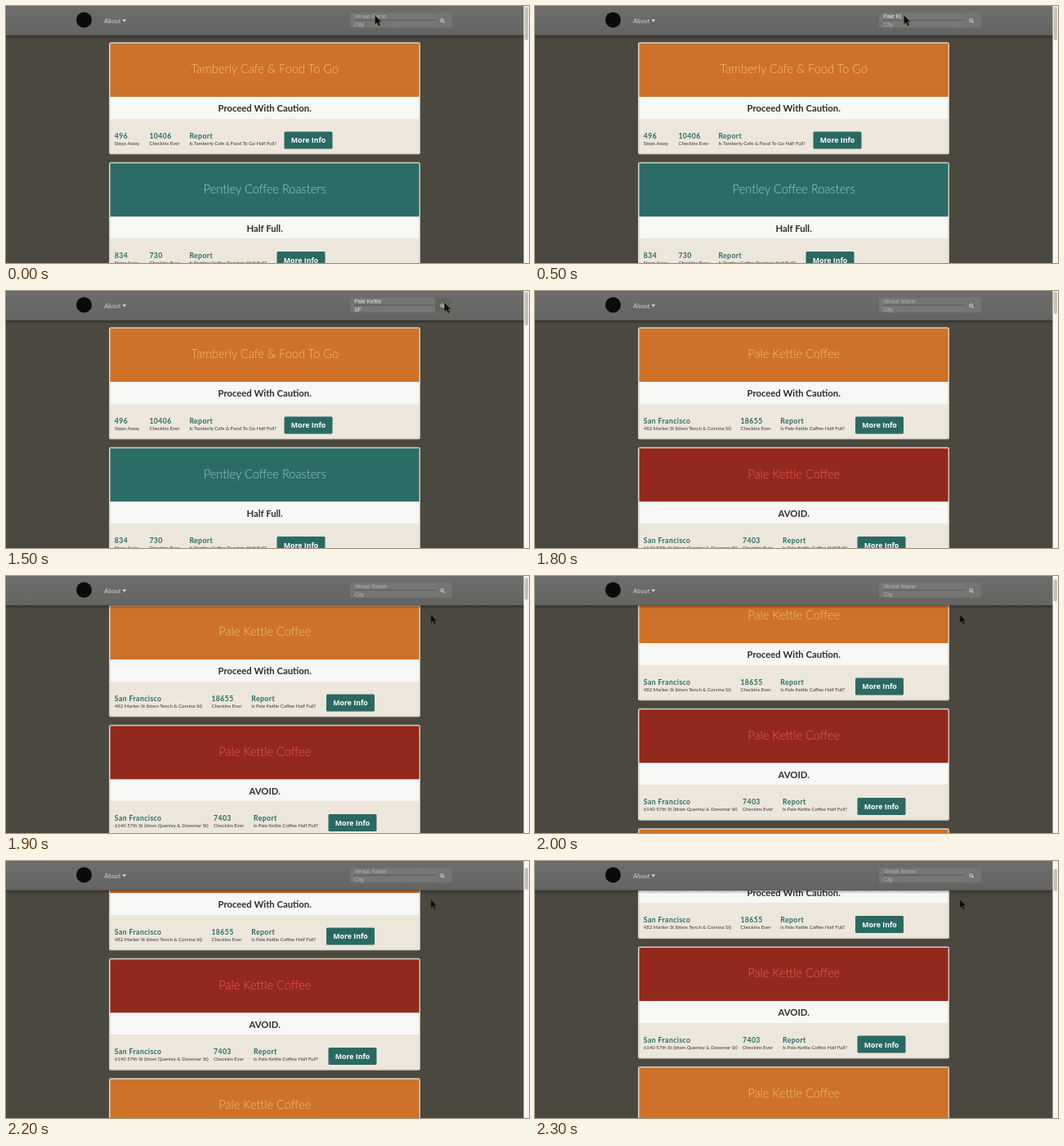
Write an HTML page that moves like this. It is 640 by 314 pixels and loops after 2800 ms.

```html
<!DOCTYPE html>
<html lang="en">
<head>
<meta charset="utf-8">
<title>Venue search</title>
<style>
  html, body { margin: 0; width: 100%; height: 100%; overflow: hidden; background: #4b4840; }
  svg { display: block; width: 100vw; height: 100vh; }
  text { font-family: Lato, sans-serif; white-space: pre; }
  .title { font-size: 14.6px; font-weight: 300; text-anchor: middle; }
  .status { font-size: 11.3px; font-weight: 700; text-anchor: middle; fill: #302d2a; }
  .head { font-size: 8.7px; font-weight: 700; letter-spacing: .4px; fill: #2b6b62; }
  .sub { font-size: 6px; fill: #3b3834; }
  .more { font: 700 8.8px "Open Sans", sans-serif; text-anchor: middle; fill: #fff; }
  .about { font-size: 7.4px; fill: #d0d0cd; }
  .field { font: 6.85px "Liberation Sans", Arial, sans-serif; fill: #b4b5b2; }
  .field.typed { fill: #e9e9e7; }
</style>
</head>
<body>
<svg viewBox="0 0 640 314" preserveAspectRatio="none">
  <defs>
    <linearGradient id="bar" x2="0" y2="1">
      <stop stop-color="#6d6e6b"/><stop offset="1" stop-color="#646562"/>
    </linearGradient>
    <linearGradient id="shade" x2="0" y2="1">
      <stop stop-color="#000" stop-opacity=".32"/><stop offset="1" stop-color="#000" stop-opacity="0"/>
    </linearGradient>
  </defs>
  <rect width="640" height="314" fill="#4b4840"/>
  <g id="home"></g>
  <g id="results"></g>

  <rect y="36" width="634" height="4" fill="url(#shade)"/>
  <rect width="634" height="36" fill="url(#bar)"/>
  <rect y="35.2" width="634" height=".8" fill="#575853"/>
  <circle cx="95.5" cy="17" r="9.5" fill="#0b0b0a"/>
  <text class="about" x="120.3" y="20.6">About</text>
  <path d="M142.3 16.6h5l-2.5 3z" fill="#e0e0de"/>

  <rect x="421" y="8.3" width="124.5" height="18" rx="1" fill="#767774"/>
  <rect id="go" x="525" y="8.3" width="20.5" height="18" rx="1"/>
  <rect x="426" y="16.8" width="99" height=".9" fill="#565753"/>
  <text id="venue" x="426.2" y="15.2"></text>
  <text id="city" x="426.2" y="25.2"></text>
  <rect id="caret" width=".7" height="6.6" fill="#e9e9e7"/>
  <g fill="none" stroke="#dededc" stroke-width="1">
    <circle cx="533.6" cy="17.6" r="1.8"/><path d="M535 19l1.8 1.8"/>
  </g>

  <rect x="633.5" width="6.5" height="314" fill="#f8f7f5"/>
  <rect id="thumb" x="634.7" width="4.3" rx="2" fill="#c6c0b2"/>
  <path id="pointer" d="M0 0V10.6L2.5 8.4L4.3 12.6L6.2 11.8L4.4 7.7H7.6Z"
        fill="#0d0906" stroke="#5d4a3a" stroke-width=".7"/>
</svg>
<script>
const $ = id => document.getElementById(id);
const STEP = 100, LOOP = 2800, LAST = 23;
const LOAD = 17;                       // step at which the results appear
const CARD_TOP = 44, PITCH = 146.5;
const NAME = "Pale Kettle", CITY = "SF";

const tones = {
  orange: ["#cd7228", "#f4c168"],
  teal: ["#2c6c66", "#9accc5"],
  red: ["#93291c", "#ee5a55"]
};

const safe = s => s.replace(/&/g, "&amp;");
const text = (cls, x, y, s) => `<text class="${cls}" x="${x}" y="${y}">${safe(s)}</text>`;
const box = (x, y, w, h, fill, rx = 0) =>
  `<rect x="${x}" y="${y}" width="${w}" height="${h}" rx="${rx}" fill="${fill}"/>`;

function card(c, i) {
  const [back, ink] = tones[c.tone];
  const facts = [c.first, [c.checkins, "Checkins Ever"], ["Report", `Is ${c.name} Half Full?`]];
  return `<g transform="translate(0 ${CARD_TOP + i * PITCH})">` +
    box(126, .2, 381, 137, "#d5cfc3", 2.5) +
    box(127.6, 1.8, 378, 65.2, back) +
    box(127.6, 67, 378, 27, "#f7f7f6") +
    box(127.6, 94, 378, 41.8, "#ece6db") +
    `<g fill="${ink}">${text("title", 316.7, 38.2, c.name)}</g>` +
    text("status", 316.7, 85, c.status) +
    facts.map(([head, sub], k) =>
      text("head", c.x[k], 117.6, head) + text("sub", c.x[k], 125.5, sub)).join("") +
    box(c.x[3], 109.4, 59, 21, "#2a6963", 1.5) +
    text("more", c.x[3] + 29.5, 123.4, "More Info") + "</g>";
}

const caution = "Proceed With Caution.";
$("home").innerHTML = [
  { name: "Tamberly Cafe & Food To Go", tone: "orange", status: caution,
    first: ["496", "Steps Away"], checkins: "10406", x: [132.8, 175.4, 224.4, 340.5] },
  { name: "Pentley Coffee Roasters", tone: "teal", status: "Half Full.",
    first: ["834", "Steps Away"], checkins: "730", x: [132.8, 175.4, 224.4, 331.5] }
].map(card).join("");

const shop = NAME + " Coffee", town = "San Francisco";
const near = [town, "482 Marlen St (btwn Tench & Corvina St)"];
$("results").innerHTML = [
  { name: shop, tone: "orange", status: caution, first: near,
    checkins: "18655", x: [132.8, 251.4, 300.3, 392] },
  { name: shop, tone: "red", status: "AVOID.",
    first: [town, "6140 57th St (btwn Quenley & Dovemar St)"],
    checkins: "7403", x: [132.8, 254, 303, 394.5] },
  { name: shop, tone: "orange", status: caution, first: near,
    checkins: "18655", x: [132.8, 251.4, 300.3, 392] }
].map(card).join("");

const scrolls = [0, 9, 29, 53.6, 72, 86.3];   // from step 18 on
const clamp = (v, lo, hi) => Math.min(hi, Math.max(lo, v));

function pointerAt(n) {
  if (n >= LOAD) return [519.8, 47];
  const p = clamp((n - 11) / 3, 0, 1), e = p * p * (3 - 2 * p);
  return [451.6 + 85 * e, 11.6 + 3 * e];
}

function fill(id, typed, hint) {
  $(id).textContent = typed || hint;
  $(id).setAttribute("class", typed ? "field typed" : "field");
}

function set(id, attrs) {
  for (const k in attrs) $(id).setAttribute(k, attrs[k]);
}

function draw(n) {
  const loaded = n >= LOAD;
  const scroll = scrolls[clamp(n - 18, 0, 5)];
  const venue = loaded ? "" : NAME.slice(0, clamp(Math.round(1.5 * (n - 1)), 0, NAME.length));
  const city = loaded ? "" : CITY.slice(0, clamp(n - 8, 0, 2));
  fill("venue", venue, "Venue Name");
  fill("city", city, "City");

  const active = city ? "city" : "venue";
  const width = city || venue ? $(active).getComputedTextLength() : 0;
  set("caret", {
    x: 426.6 + width, y: city ? 19.3 : 9.4,
    visibility: n >= 1 && n <= 12 ? "visible" : "hidden"
  });
  set("go", { fill: n >= 14 && !loaded ? "#62635f" : "#747572" });
  set("home", { visibility: loaded ? "hidden" : "visible" });
  set("results", { visibility: loaded ? "visible" : "hidden", transform: `translate(0 ${-scroll})` });
  set("thumb", { y: 1 + scroll * .1, height: loaded ? 27 : 41 });
  set("pointer", {
    transform: `translate(${pointerAt(n)})`,
    visibility: n === 17 || n === 18 ? "hidden" : "visible"
  });
}

let shown = -1;
const start = performance.now();
function tick() {
  const n = Math.min(LAST, Math.floor((performance.now() - start) % LOOP / STEP));
  if (n !== shown) draw(shown = n);
  requestAnimationFrame(tick);
}
tick();
</script>
</body>
</html>
```
